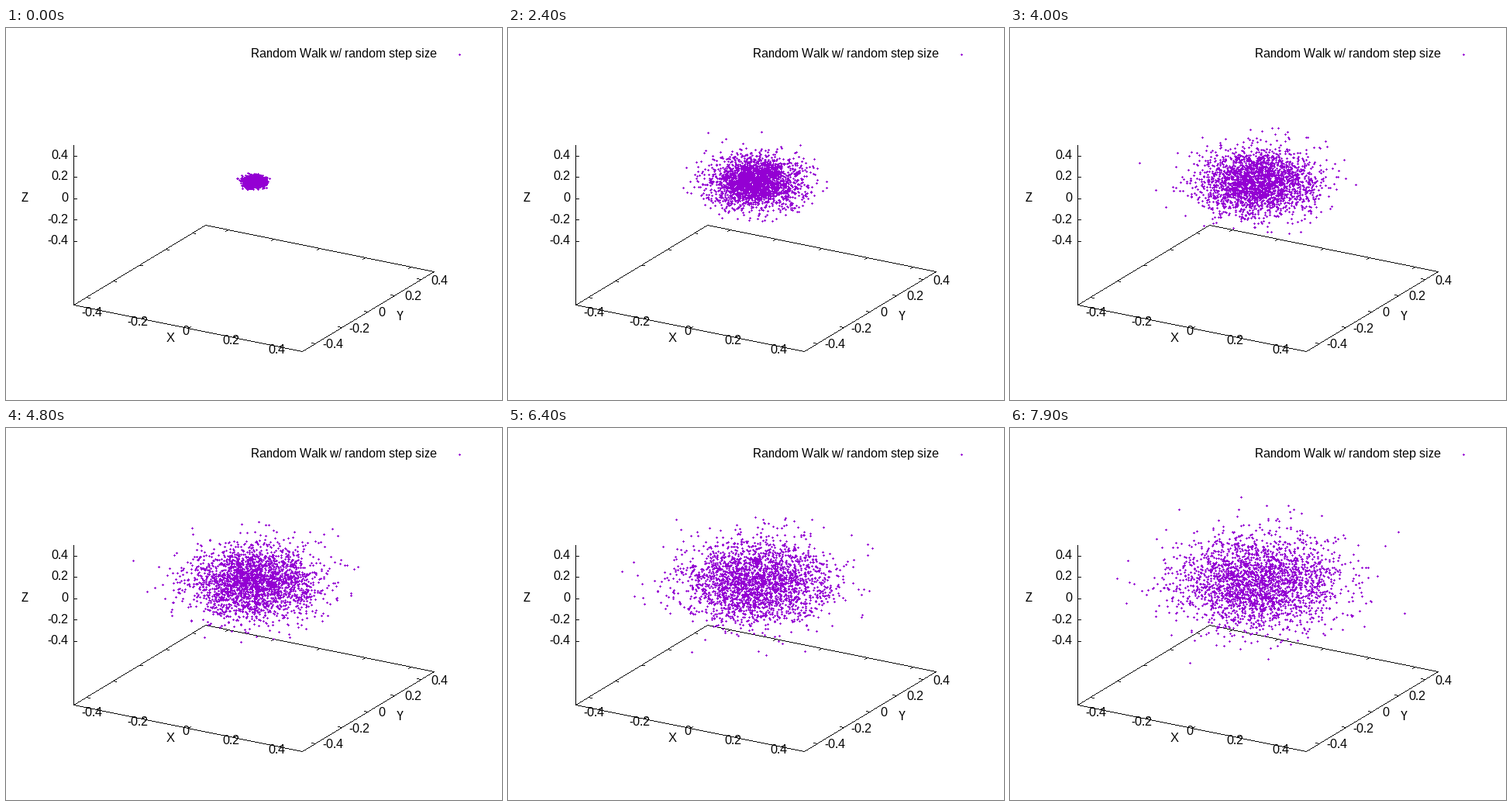
A matplotlib script that plays this animation: 640 by 480 pixels, repeating every 8000 ms.

```python
import numpy as np
import matplotlib.pyplot as plt
from matplotlib.animation import FuncAnimation

W, H, DPI = 640, 480, 100
FRAMES, INTERVAL = 80, 100
PX = 72 / DPI
WALKERS = 2500
STEP = 0.0168 * np.array([1, 1, 1.13])
BLACK, PURPLE = (0, 0, 0, 255), (148, 0, 211, 255)

# Screen vectors of one unit along x, y and z
CORNER = np.array([87.5, 357.5])
EX, EY, EZ = np.array([[294.6, 60], [170, -103], [0, -137.5]])
TICKS = (-0.4, -0.2, 0, 0.2, 0.4)

plt.rcParams.update({"font.family": "Liberation Sans",
                     "text.hinting": "default", "text.hinting_factor": 1})

fig = plt.figure(figsize=(W / DPI, H / DPI), dpi=DPI, facecolor="white")
ax = fig.add_axes([0, 0, 1, 1])
ax.axis("off")
base = np.zeros((H, W, 4), np.uint8)


def project(x, y, z):
    """Map data coordinates to pixels; the floor lies at z = -1."""
    return CORNER + np.multiply.outer(x + 0.5, EX) \
        + np.multiply.outer(y + 0.5, EY) + np.multiply.outer(z + 1.0, EZ)


def floor(x, y):
    return project(x, y, -1.0)


def line(a, b):
    """Draw a hard-edged line one pixel wide."""
    a, b = np.floor(a), np.floor(b)
    n = int(np.abs(b - a).max()) + 1
    x, y = np.rint(np.linspace(a, b, n)).astype(int).T
    base[y, x] = BLACK


def text(x, y, s, ha="center"):
    ax.text(x, y, s, ha=ha, va="baseline", fontsize=16 * PX, color="black",
            zorder=2)


def draw_axes():
    a, b, c, d = (floor(x, y) for x, y in
                  ((-.5, -.5), (.5, -.5), (.5, .5), (-.5, .5)))
    for p, q in ((a, b), (b, c), (c, d), (d, a)):
        line(p, q)
    line(a, a + 1.5 * EZ)

    dx, dy = 0.0145 * EX, 0.021 * EY
    for v in TICKS:
        label = f"{v:g}"
        pad = 4 if v >= 0 else 0  # room kept for the sign

        p = floor(v, -.5)
        line(p, p + dy)
        text(p[0] - 6 + 0.7 * pad, p[1] + 9, label)
        p = floor(v, .5)
        line(p, p - dy)

        p = floor(-.5, v)
        line(p, p + dx)
        p = floor(.5, v)
        line(p, p - dx)
        text(p[0] + 9 + pad, p[1] + 6, label, "left")

        p = project(-.5, -.5, v)
        line(p, p + (4, 0))
        text(80, p[1] + 4, label, "right")

    text(212, 405, "X")
    text(508, 377, "Y")
    text(24.5, 224, "Z")
    text(556, 38, "Random Walk w/ random step size", "right")


def stamp(layer, px):
    """Draw a three pixel plus at each integer position."""
    x, y = px[:, 0], px[:, 1]
    for ox, oy in ((0, 0), (1, 0), (-1, 0), (0, 1), (0, -1)):
        layer[np.clip(y + oy, 0, H - 1), np.clip(x + ox, 0, W - 1)] = PURPLE


steps = np.random.default_rng(11).normal(size=(FRAMES, WALKERS, 3)) * STEP
walk = np.cumsum(steps, axis=0)

draw_axes()
stamp(base, np.array([[585, 34]]))
cloud = ax.imshow(base, extent=(0, W, H, 0), aspect="auto",
                  interpolation="nearest", zorder=3)
ax.set_xlim(0, W)
ax.set_ylim(H, 0)


def update(i):
    layer = base.copy()
    stamp(layer, np.floor(project(*walk[i].T)).astype(int))
    cloud.set_data(layer)
    return (cloud,)


anim = FuncAnimation(fig, update, frames=FRAMES, interval=INTERVAL,
                     repeat=True, repeat_delay=0, blit=False)
plt.show()
```
